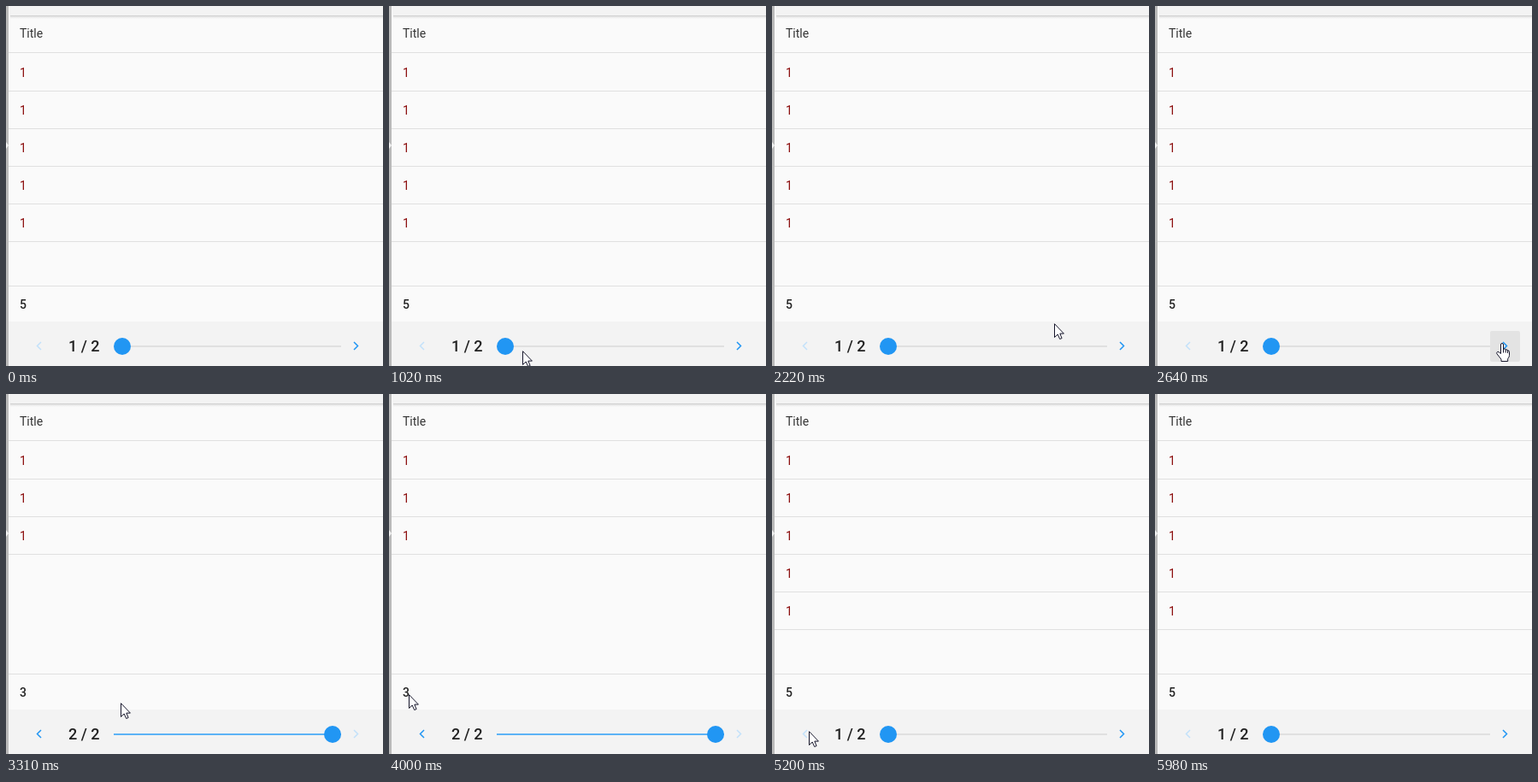
An HTML page that plays this animation: 441x421 px, repeating every 6.38 s.

```html
<!DOCTYPE html>
<html lang="en">
<head>
<meta charset="utf-8">
<title>Paged list</title>
<style>
  html, body { margin: 0; width: 100%; height: 100%; overflow: hidden; background: #fafafa; }
  svg { display: block; width: 441px; height: 421px; }
  text { font: 400 14px Roboto, sans-serif; fill: #333; }
  .cell { fill: #8b0d0d; }
  .total { font-weight: 500; fill: #222; }
  .pager { font-weight: 500; font-size: 18px; fill: #222; }
  .chevron { fill: none; stroke: #2196f3; stroke-width: 1.5; }
  .chevron.off { stroke: #c3e1fa; }
  .cursor { fill: #fff; stroke: #15152a; stroke-width: 1; stroke-linejoin: round; }
</style>
</head>
<body>
<svg viewBox="0 0 441 421">
  <defs>
    <linearGradient id="shade" x2="0" y2="1">
      <stop offset="0" stop-color="#c9c9c9"/>
      <stop offset=".4" stop-color="#e6e6e6"/>
      <stop offset="1" stop-color="#fafafa"/>
    </linearGradient>
  </defs>
  <rect width="441" height="421" fill="#fafafa"/>
  <rect x="3" y="369" width="438" height="52" fill="#f3f3f3"/>
  <rect x="5" y="11" width="436" height="4" fill="url(#shade)"/>
  <rect x="4" width="440" height="11" rx="1" fill="#f3f3f3"/>
  <rect width="3" height="421" fill="#bababa"/>
  <path d="M0 159 L3 163 L0 167Z" fill="#f4f4f4"/>

  <text x="16" y="37">Title</text>
  <path d="M3 54.5H441M3 327.5H441" stroke="#e0e0e0"/>
  <g id="rows"></g>
  <text id="total" class="total" x="16" y="354"></text>

  <rect id="hover" y="380" width="35" height="36" rx="2" fill="#e3e3e3"/>
  <path id="prev" class="chevron" d="M41 393 L36.5 397.5 L41 402"/>
  <path id="next" class="chevron" d="M407 393 L411.5 397.5 L407 402"/>
  <text id="pager" class="pager" x="73" y="404"></text>
  <rect id="track" x="126" y="397" width="266" height="2"/>
  <circle id="thumb" cy="398" r="10" fill="#2196f3"/>

  <path id="arrow" class="cursor" d="M.5 .7V16.5L4.2 13L6.7 18.5L9.1 17.5L6.8 12.1H11.4Z"/>
  <g id="hand" class="cursor">
    <path d="M5.5 12.5V2A1.5 1.5 0 0 1 8.5 2V7.2Q10.9 6 11.2 8Q13.4 7.2 13.6 9Q15.5 8.6 15.5 10.6V14.5Q15.4 16.5 13.7 18.5V21.5H6V19.2L1 12.8Q.1 11 1.7 10.4Q3 10.2 5.5 12.5Z"/>
    <path d="M8.5 7V11.5M11.2 8V11.5M13.6 9V12" fill="none"/>
  </g>
</svg>
<script>
const LOOP = 6380;
const $ = id => document.getElementById(id);

// time, x, y of the pointer; the fourth value picks its shape
const POINTER = [
  [0], [1020, 156, 403, 'arrow'], [1140, 63, 379, 'arrow'],
  [1290, 33, 358, 'arrow'], [1410, 18, 343, 'arrow'], [1530, 16, 347, 'arrow'],
  [1650, 25, 354, 'arrow'], [1800, 9, 342, 'arrow'], [1950, 12, 352, 'arrow'],
  [2100, 165, 366, 'arrow'], [2220, 330, 371, 'arrow'], [2370, 383, 391, 'arrow'],
  [2520, 396, 393, 'hand'], [2640, 399, 394, 'hand'], [3040, 403, 394, 'arrow'],
  [3190, 290, 382, 'arrow'], [3310, 134, 361, 'arrow'],
  [3460, 70, 347, 'arrow'], [3580, 37, 342, 'arrow'],
  [3730, 32, 336, 'arrow'], [3850, 30, 333, 'arrow'],
  [4000, 23, 351, 'arrow'], [4120, 27, 345, 'arrow'],
  [4270, 56, 364, 'arrow'], [4390, 78, 382, 'arrow'],
  [4540, 60, 391, 'arrow'], [4660, 48, 394, 'hand'], [4810, 38, 394, 'hand'],
  [5200, 43, 394, 'arrow'], [5440, 50, 393, 'arrow'],
  [5590, 199, 394, 'arrow'], [5740, 280, 399, 'arrow'], [5860, 357, 410, 'arrow'], [5980]
];
// time, left edge of the highlighted button
const HOVER = [[0], [2520, 392], [3040], [4660, 21], [5200]];
const PAGES = [[0, 1], [2920, 2], [5080, 1]];
const VIEWS = {
  1: { rows: 5, total: 5, thumb: 136, track: '#e0e0e0' },
  2: { rows: 3, total: 3, thumb: 382, track: '#5cb3f6' }
};

for (let i = 0; i < 5; i++) {
  const y = 55 + 44 * i;
  $('rows').insertAdjacentHTML('beforeend',
    `<g><text class="cell" x="16" y="${y + 28}">1</text><path d="M3 ${y + 44.5}H441" stroke="#e0e0e0"/></g>`);
}

const at = (steps, t) => steps.findLast(step => step[0] <= t);
const show = (node, on) => node.setAttribute('visibility', on ? 'visible' : 'hidden');

function showPage(page) {
  const view = VIEWS[page];
  [...$('rows').children].forEach((row, i) => show(row, i < view.rows));
  $('total').textContent = view.total;
  $('pager').textContent = `${page} / 2`;
  $('thumb').setAttribute('cx', view.thumb);
  $('track').setAttribute('fill', view.track);
  $('prev').classList.toggle('off', page === 1);
  $('next').classList.toggle('off', page === 2);
}

let shownPage;
function draw(t) {
  const page = at(PAGES, t)[1];
  if (page !== shownPage) showPage(shownPage = page);

  const left = at(HOVER, t)[1];
  show($('hover'), left !== undefined);
  if (left !== undefined) $('hover').setAttribute('x', left);

  const [, x, y, shape] = at(POINTER, t);
  for (const id of ['arrow', 'hand']) show($(id), id === shape);
  if (shape) $(shape).setAttribute('transform', `translate(${x} ${y})`);
}

const start = performance.now();
function tick() {
  draw((performance.now() - start) % LOOP);
  requestAnimationFrame(tick);
}
tick();
</script>
</body>
</html>
```
